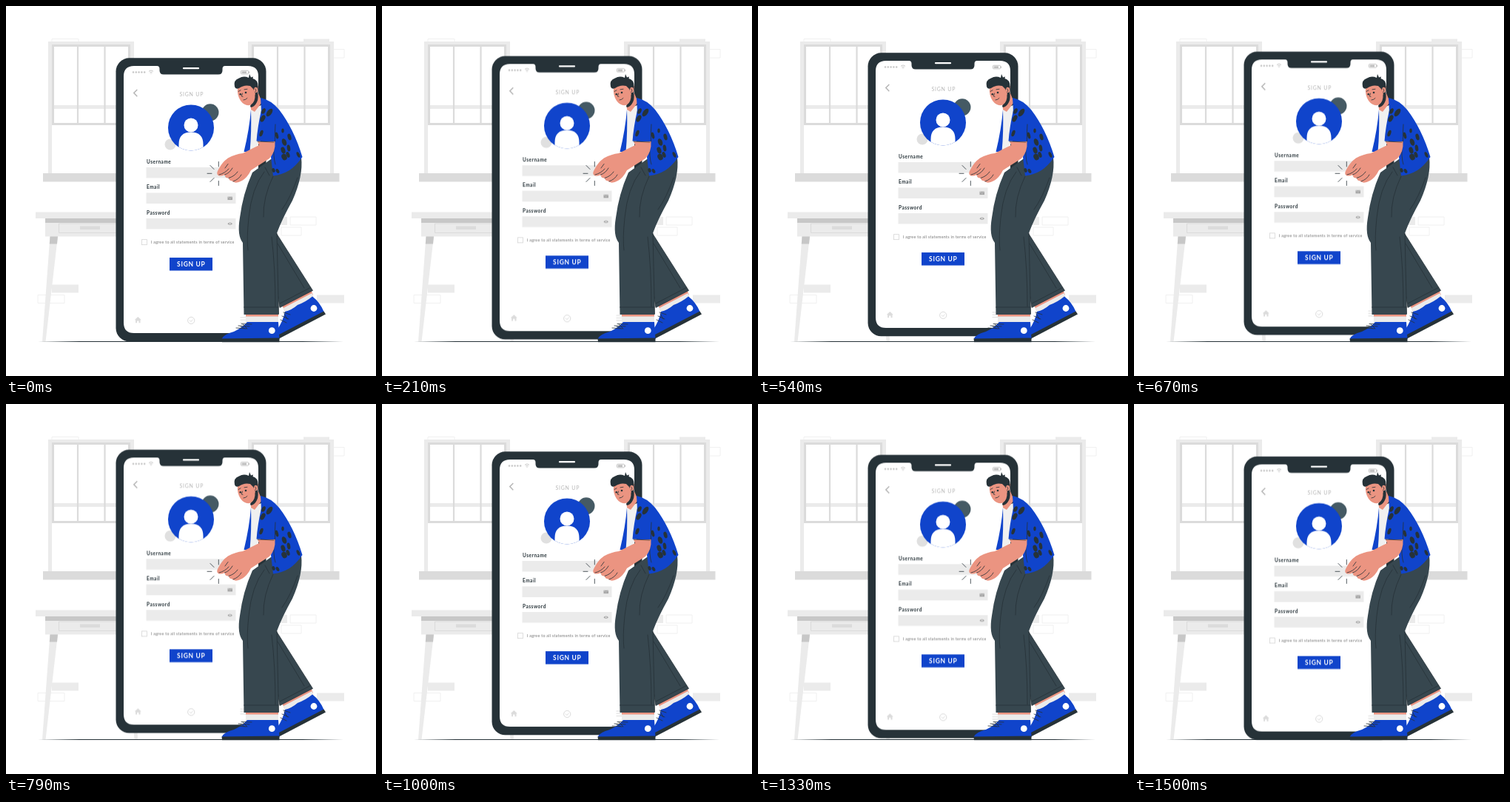
Animation, 500 px wide and 500 px high, one loop 1540 ms. Source, as an HTML page:

```html
<!DOCTYPE html>
<html lang="en">
<head>
<meta charset="utf-8">
<title>Sign up</title>
<style>
  html, body { margin: 0; width: 100%; height: 100%; overflow: hidden; background: #fff; }
  svg { display: block; width: 100vw; height: 100vh; }
  text { font-family: Lato, "Open Sans", sans-serif; }
  .label { font-size: 6.5px; font-weight: 700; letter-spacing: .5px; fill: #263238; }
  .line { fill: none; stroke: #263238; stroke-width: .8; stroke-linecap: round; stroke-linejoin: round; }
  .blue { fill: #1044cb; }
  .dark { fill: #263238; }
  .skin { fill: #eb9481; }
  .pale { fill: #ebebeb; }
  .faint { fill: none; stroke: #ececec; stroke-width: .8; }
  .icon { fill: none; stroke: #dcdcdc; stroke-width: 1; }
</style>
</head>
<body>
<svg viewBox="0 0 500 500">
  <defs>
    <clipPath id="disc"><circle cx="250" cy="164.5" r="31"/></clipPath>
    <g id="window">
      <path fill="#ebebeb" d="M57 48H173V226H57ZM62 52V226H168V52Z" fill-rule="evenodd"/>
      <path fill="#ebebeb" d="M65 134H165V139H65ZM62 52H168V55H62Z"/>
      <path fill="none" stroke="#dbdbdb" stroke-width="3" d="M63.5 53.5H166.500V159.500H63.500Z"/>
      <path fill="none" stroke="#dbdbdb" stroke-width="2.2" d="M97 54V159M133.500 54V159"/>
    </g>
  </defs>

  <g id="room">
    <use href="#window"/>
    <use href="#window" x="270"/>
    <path fill="#dbdbdb" d="M50 226H180V237.500H50ZM320 226H450.500V237.500H320Z"/>
    <path class="pale" d="M402 44.500H437V48H402ZM62 376.500H98V387.500H62ZM364 285H380V296H364ZM420 390.500H457V401.500H420Z"/>
    <path class="faint" d="M62 48V44.500H98V48M443 58.500H457V70H443M43 390.500H79V401.500H43ZM384 285H419V296H384ZM372 299H399V310H372Z"/>
    <path class="pale" d="M40 278.500H190V287H40ZM53 293H190V311.500H53ZM59.500 311H70L53.500 453.500H49ZM163 311H173L178 453.500H173.500Z"/>
    <path fill="#c7c7c7" d="M53 287H190V293H53ZM59.500 311.500H70L69 321.500H58.800Z"/>
    <path fill="none" stroke="#dbdbdb" d="M160 294H71.500V306.500H160"/>
    <rect x="100" y="297.500" width="27" height="4.500" fill="#dbdbdb"/>
    <path class="dark" d="M43 453.500L100 453.100H400L456 453.500L400 453.900H100Z"/>
  </g>

  <g id="phone">
    <rect class="dark" x="148.500" y="70.400" width="203" height="383" rx="18"/>
    <path fill="#fff" d="M173 81H204Q207.500 81 207.500 85V87Q207.500 92.500 213 92.500H287Q292.500 92.500 292.500 87V85Q292.500 81 296 81H327Q341 81 341 95V428Q341 442 327 442H173Q159 442 159 428V95Q159 81 173 81Z"/>
    <path stroke="#fff" stroke-width="2.200" stroke-linecap="round" d="M240 84.200H260"/>
    <path stroke="#c7c7c7" stroke-width="2.600" stroke-linecap="round" stroke-dasharray="0 3.800" d="M172 89.500H188"/>
    <path fill="none" stroke="#c7c7c7" stroke-width="1" d="M193 88.300Q196 85.700 199 88.300M194.400 90Q196 88.700 197.600 90M195.500 91.500H196.500"/>
    <rect x="317.500" y="87.300" width="10" height="4.600" rx="1" fill="none" stroke="#b5b5b5" stroke-width=".8"/>
    <path fill="#b5b5b5" d="M318.700 88.500H325V90.800H318.700ZM328.300 88.600H329.200V90.700H328.300Z"/>
    <path fill="none" stroke="#b5b5b5" stroke-width="1.500" d="M177.300 113L172.800 117.600L177.300 122.200"/>
    <text x="250.800" y="122" text-anchor="middle" font-size="7" letter-spacing=".75" fill="#b8b8b8">SIGN UP</text>

    <circle cx="276" cy="143.800" r="11.500" fill="#455a64"/>
    <circle cx="222" cy="187" r="7.500" fill="#e0e0e0"/>
    <circle class="blue" cx="250" cy="164.500" r="31"/>
    <g fill="#fff" clip-path="url(#disc)">
      <circle cx="250" cy="161" r="9.500"/>
      <path d="M233.500 198V187Q233.500 170.500 250 170.500Q266.500 170.500 266.500 187V198Z"/>
    </g>

    <g id="fields"></g>
    <rect x="299.500" y="257.700" width="6.500" height="4.400" fill="#a6a6a6"/>
    <path fill="none" stroke="#ddd" stroke-width=".5" d="M299.700 258L302.800 260.300L305.800 258"/>
    <path fill="#a6a6a6" d="M299.300 294.300Q302.700 290.800 306.100 294.300Q302.700 297.800 299.300 294.300Z"/>
    <circle cx="302.700" cy="294.300" r=".9" fill="#ebebeb"/>

    <rect x="183.400" y="315.700" width="7" height="7" fill="#fff" stroke="#d5d5d5" stroke-width=".8"/>
    <text x="195.800" y="321.500" font-size="5.300" letter-spacing=".3" fill="#737373">I agree to all statements in terms of service</text>
    <rect class="blue" x="221" y="340.100" width="58" height="17.500"/>
    <text x="250.300" y="352" text-anchor="middle" font-size="8.500" font-weight="700" letter-spacing=".7" fill="#fff">SIGN UP</text>

    <path fill="#dcdcdc" d="M173.700 424.300L178.300 420L182.900 424.300H181.500V428.300H179.500V425.500H177.100V428.300H175.100V424.300Z"/>
    <circle class="icon" cx="250.200" cy="425" r="4.600"/>
    <path class="icon" d="M248 424.600L249.800 426.500L252.600 423.800M316.500 421H326M316.500 424.300H326M316.500 427.600H326"/>
  </g>

  <g id="man">
    <path class="skin" d="M373 404L412 384L415 390L376 411Z"/>
    <path class="pale" d="M375 408L413.500 388L417 396L377 420Z"/>
    <path class="blue" d="M377 413Q386 411 394 404Q405 400 414 392.500Q424 400 429.500 413L369 446L366 438Q374 427 377 413Z"/>
    <path class="dark" d="M368 444.500L429.500 412.500L432 416.500L369 449.500Z"/>
    <circle cx="416" cy="408.500" r="4.400" fill="#fff"/>
    <path class="line" stroke-width="1.500" d="M375 414L384 417M373 419L382 423M371 424L379 428M376 416L380 423"/>
    <path fill="#37474f" stroke="#263238" stroke-width=".8" d="M364 305L414.500 384.500L370 407.500L364 370Z"/>
    <path class="line" d="M370 402L411.500 380.500M367 321L403 381"/>

    <path class="skin" d="M324 415H368V421H324Z"/>
    <path class="pale" d="M324 419.500H368V429H324Z"/>
    <path class="blue" d="M291.500 450Q294 443.500 308 440Q319 435 326 427H368L369.500 450Z"/>
    <path class="dark" d="M291.500 449.500L369.500 448.500V454.300H292Z"/>
    <circle cx="359.300" cy="438.700" r="4.400" fill="#fff"/>
    <path class="line" stroke-width="1.500" d="M318 429.500L332 430M314 432L329 433M311 435L325 436M320 430L326 436M317 433L322 435.500"/>
    <path fill="#37474f" d="M358 207L399 205Q402 229 387 263Q373 288 366 307L368.500 417H321.500L320 320Q312 310 316 286Q320 254 333 225Z"/>
    <path class="line" d="M366 307L368.500 416M321.500 407H368M349 224Q332 246 328 286Q325 315 327 330M356 229L350 218M361 230Q347 259 348 285M359 312Q364 355 364 406M394 232Q384 260 373 275"/>

    <path fill="#f0f0f0" d="M331 139L345 134L344 184L330 198H326Z"/>
    <path class="blue" d="M331 140Q329 166 321.500 197H329.500Q332 170 331 140Z"/>
    <path class="skin" d="M330 128L341 118L346 130L336 143L331 140Z"/>
    <path class="blue" d="M344 124Q358 127 369 140Q389 166 400.500 204Q392 216 383 222Q373 228 361 229.500L358 204L363 183.500L338.500 182.500Q340 163 345 141Z"/>
    <g id="spots" class="dark"></g>
    <path class="line" d="M364 160Q363 173 363.500 184M362 185Q361 205 364 214"/>
    <path class="skin" d="M340 183H363.500Q364.500 197 356 206L331 222Q326 232 319 236Q310 241 305.500 236.500Q301 236 301 232.500Q296 233 295.500 228Q291 230.500 287 229Q283.500 227 287 221Q292 211 300 205.500Q310 200 320 199L342 188Z"/>
    <path class="line" d="M288 228Q296 226 301 220M295.500 228Q302 226 306 219M301 232.500Q309 230 313 224M307 237Q315 234 318 228M340 183L362 184"/>

    <path class="skin" d="M313 109Q312 121 317 128Q322 135 329 134Q337 132 340 123L341 108L326 102Z"/>
    <path class="dark" d="M339.500 112Q342 125 339 130Q336 136 331 137Q329 135 331.500 133Q337 129 336.500 120Z"/>
    <path class="dark" d="M309 109Q307 100 315 97.500Q321 94 328 97L329 92L331 96.500L334 95.500L333.500 98Q341 100 340.500 109Q341.500 117 338 121L334 112L330 108Q322 106 315 111Q310 113 309 109Z"/>
    <ellipse class="skin" cx="337.500" cy="113.500" rx="2.600" ry="3.800"/>
    <path class="line" d="M314 115.500L317 113.800M322 112.800L326 112.300M319.500 118L318.300 122L320 122.500M321 127Q324 127 326 124.500M336.500 112Q339 113 337 116"/>
    <circle class="dark" cx="316.800" cy="119.300" r="1.300"/>
    <circle class="dark" cx="324" cy="117" r="1.300"/>
  </g>

  <path class="line" stroke-width="1" d="M272 226.300H278M287.300 210.500V217M287.300 236.500V242.500M276 215.500L281 220.500M276 237.500L281 232.500M300 213.500L296 219"/>
</svg>
<script>
  const el = (id) => document.getElementById(id);

  el("fields").innerHTML = ["Username", "Email", "Password"].map((name, i) => {
    const y = 218 + i * 34.5;
    return `<text class="label" x="190" y="${y - 5}">${name}</text>
      <rect class="pale" x="189.5" y="${y}" width="121" height="14.500"/>`;
  }).join("");

  // x, y, rx, ry, tilt
  const spots = [
    [356, 144, 3.2, 6, 35], [347, 152, 2.8, 5, 30], [348, 142, 2.4, 4, 25],
    [345, 172, 2.2, 4.5, 20], [366, 175, 2, 4.5, -15], [374, 168.5, 1.7, 3, 0],
    [376, 184, 3, 5, -20], [383, 177, 2.4, 4.5, -15], [374.5, 195, 2.8, 4.5, -20],
    [382, 192, 2.2, 4.5, -10], [376, 204, 3.5, 4.5, -25], [381, 201, 2.3, 4, -20],
    [395, 201, 2, 4, -25], [367, 223, 2, 3.2, -30], [361.5, 222, 2, 3, -20]
  ];
  el("spots").innerHTML = spots.map(([x, y, rx, ry, tilt]) =>
    `<ellipse rx="${rx}" ry="${ry}" transform="translate(${x} ${y}) rotate(${tilt})"/>`).join("");

  // The phone floats up 10 units and back at constant speed.
  const shift = (y) => ({ transform: `translateY(${y}px)` });
  el("phone").animate([shift(0.5), shift(-9.5), shift(0.5)],
    { duration: 1540, delay: -40, iterations: Infinity, easing: "linear" });
</script>
</body>
</html>
```
